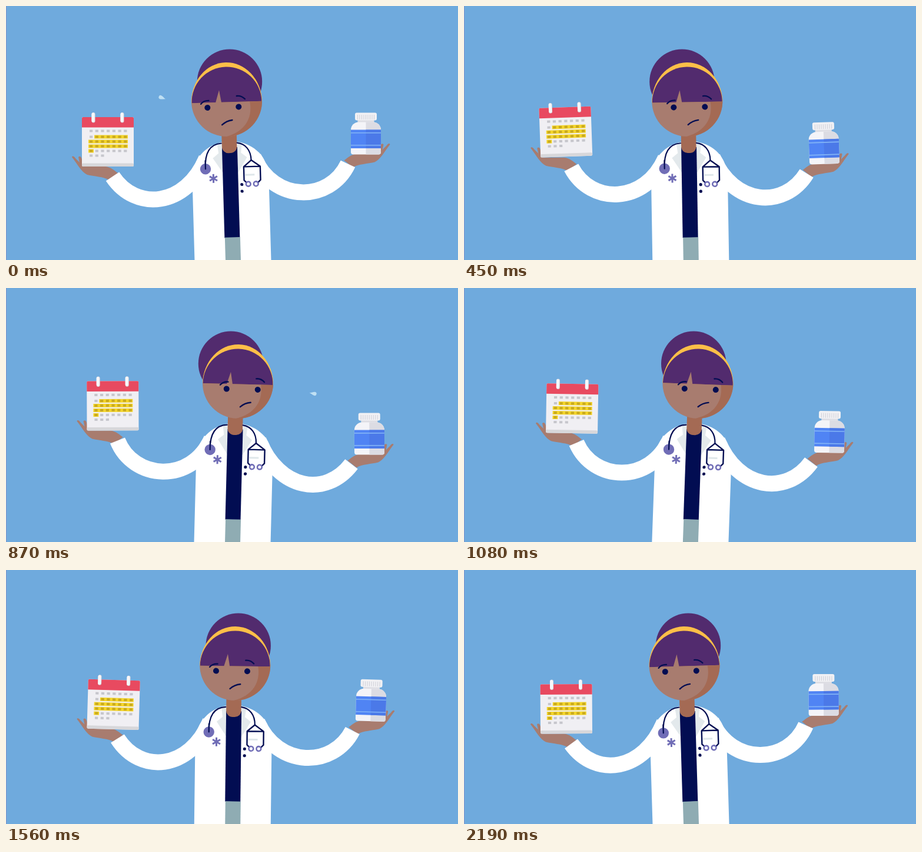
An HTML page with a canvas for the animation above (2220 ms loop, 768 by 432 pixels).

```html
<!DOCTYPE html>
<html lang="en">
<head>
<meta charset="utf-8">
<title>Doctor weighing options</title>
<style>
html, body { margin: 0; width: 100%; height: 100%; overflow: hidden; background: #6faadd; }
canvas { display: block; width: 100vw; height: 100vh; }
</style>
</head>
<body>
<canvas id="stage" width="768" height="432"></canvas>
<script>
const ctx = document.getElementById('stage').getContext('2d');
const LOOP = 2220, STEP = 30, SWAY = 2400;
const NAVY = '#020d52', SKIN = '#a87c6f', SHADE = '#a46a54', HAIR = '#522b6e',
  BAND = '#fdbf48', LILAC = '#706db6', COAT = '#ffffff', TAU = Math.PI * 2;
const PIVOT = 415;

// Pose keys; the sway is a little longer than the loop.
const TIMES = [0, 240, 630, 870, 1290, 1800, 2190];
const POSE = {
  head: [375, 375, 385, 394, 397, 381, 374.5],
  bun: [380, 372, 373, 382, 396, 390, 381],
  gaze: [-33, -28, -20, -19, -27, -35, -33],
  leftX: [181, 180.5, 185, 189.5, 191, 187, 182],
  leftY: [290, 283.5, 267, 259.5, 272, 297, 295.5],
  rightX: [581, 581.5, 583.5, 587, 591.5, 585, 580.7],
  rightY: [268.5, 276, 292, 299.5, 288, 262.5, 264],
  tilt: [0, -2, -1.3, -0.2, 1.8, 1, -0.3]
};

function sample(v, t) {
  const n = TIMES.length;
  const wrap = i => (i + n) % n;
  const time = i => TIMES[wrap(i)] + SWAY * Math.floor(i / n);
  const slope = i => (v[wrap(i + 1)] - v[wrap(i)]) / (time(i + 1) - time(i));
  const tangent = i => {
    const a = time(i) - time(i - 1), b = time(i + 1) - time(i);
    return (b * slope(i - 1) + a * slope(i)) / (a + b);
  };
  let i = 0;
  while (i < n - 1 && TIMES[i + 1] <= t) i++;
  const h = time(i + 1) - time(i), u = (t - time(i)) / h, w = 1 - u;
  return v[i] * (1 + 2 * u) * w * w + tangent(i) * h * u * w * w +
    v[wrap(i + 1)] * u * u * (3 - 2 * u) - tangent(i + 1) * h * u * u * w;
}

function shape(d, color) {
  ctx.fillStyle = color;
  ctx.fill(new Path2D(d));
}

function line(d, color, width, cap = 'round') {
  ctx.strokeStyle = color;
  ctx.lineWidth = width;
  ctx.lineCap = cap;
  ctx.lineJoin = 'round';
  ctx.stroke(new Path2D(d));
}

function rect(x, y, w, h, color, r = 0) {
  ctx.fillStyle = color;
  ctx.beginPath();
  ctx.roundRect(x, y, w, h, r);
  ctx.fill();
}

function disc(x, y, r, color) {
  ctx.fillStyle = color;
  ctx.beginPath();
  ctx.arc(x, y, r, 0, TAU);
  ctx.fill();
}

function ring(x, y, r, color, width) {
  ctx.strokeStyle = color;
  ctx.lineWidth = width;
  ctx.beginPath();
  ctx.arc(x, y, r, 0, TAU);
  ctx.stroke();
}

function at(x, y, angle, draw) {
  ctx.save();
  ctx.translate(x, y);
  ctx.rotate(angle);
  draw();
  ctx.restore();
}

// side is 1 for the arm on the left of the stage, -1 for the other one
function arm(x, y, side, lean) {
  const drop = y - 260, angle = (22 + drop * 0.39) * Math.PI / 180;
  const sx = 385 - side * 40 + lean * (PIVOT - 258), sy = 258 - side * 40 * lean;
  ctx.strokeStyle = COAT;
  ctx.lineWidth = 27;
  ctx.lineCap = 'butt';
  ctx.beginPath();
  ctx.moveTo(x, y);
  ctx.bezierCurveTo(x + side * 72 * Math.sin(angle), y + 72 * Math.cos(angle),
    sx - side * 35, 334 + drop * 0.26, sx, sy);
  ctx.stroke();
}

function hand(x, y, side) {
  ctx.save();
  ctx.translate(x, y);
  ctx.scale(side, 1);
  shape('M-58 -33C-55 -36 -53 -33 -52 -29L-48 -17L-54 -14Z', SKIN);
  shape('M-69 -33C-68 -36 -65 -34 -63 -31L-54 -22L-50 -17L-12 -17C-3 -16 2 -11 9 -6' +
    'L-6 6C-15 0 -32 0 -43 -3C-52 -7 -59 -20 -69 -33Z', SKIN);
  ctx.restore();
}

function calendar() {
  const rows = [23.5, 33.5, 41.5, 49.5, 57.5, 65.5];
  rect(0, -84, 88, 84, '#f0eff3', 2);
  rect(0, -5.5, 88, 5.5, '#d7d7da', 2);
  rect(0, -84, 88, 17.5, '#e84a60', [2, 2, 0, 0]);
  [[21, 1, 57], [11, 2, 67], [11, 3, 67], [11, 4, 9]].forEach(([x, r, w]) =>
    rect(x, rows[r] - 87, w, 6, '#f4d52b'));
  rows.forEach((y, r) => {
    for (let c = 0; c < (r === 5 ? 3 : 7); c++) {
      const marked = r === 1 ? c > 0 : r === 2 || r === 3 || (r === 4 && c === 0);
      rect(13 + c * 9.7, y - 86, 5.2, 4, marked ? '#c8a91f' : '#c6c6cc');
    }
  });
  [19.5, 68.5].forEach(x => {
    line(`M${x} -89V-77.5`, '#d9d9df', 6);
    line(`M${x - 0.5} -89V-78`, '#f7f7fa', 5);
  });
}

function bottle() {
  rect(-14, -60, 28, 9, '#dedee4');
  rect(-25.5, -55, 51, 55, '#f4f4f8', [13, 13, 4, 4]);
  rect(0, -55, 25.5, 55, '#dcdce3', [0, 13, 4, 0]);
  rect(-25.5, -42, 51, 31.5, '#5084f4');
  rect(0, -42, 25.5, 31.5, '#4b79e8');
  [-37.5, -16.5].forEach(y => rect(-25.5, y, 51, 1.6, '#83b5f7'));
  rect(-18.5, -71, 37, 13, '#f1f1f4', 3);
  for (let x = -14; x <= 14; x += 3.5) rect(x - 0.5, -67.5, 1, 8, '#cfcfd7');
}

function torso() {
  shape('M320 450V302C320 278 324 264 336 251C346 240 358 234 372 231H398' +
    'C413 234 425 240 435 251C446 264 450 278 450 302V450Z', COAT);
  shape('M364 235L373 232V284L356 258L366 250Z', '#e3e9ec');
  shape('M406 235L398 232V284L414 258L404 250Z', '#e3e9ec');
  rect(372, 240, 26, 154, NAVY);
  rect(372.5, 393.5, 26, 50, '#8facb3');
  rect(372, 205, 25.5, 45, SHADE, [0, 0, 11, 11]);

  line('M371 233C353 234 342 246 343 276', NAVY, 2.2);
  disc(343, 276, 9.2, LILAC);
  line('M343 262V276', NAVY, 2.2);
  line('M398 233C412 235 421 246 421 263', NAVY, 2.2);
  for (let i = 0; i < 3; i++) at(356, 292.5, i * Math.PI / 3, () => line('M0 -7.5V7.5', LILAC, 3, 'butt'));

  line('M421 263L408 274V297L412 301M421 263L436 274V297L432 301M409 274H435', NAVY, 2.4);
  rect(410, 286.5, 16, 3, '#dfe7ea');
  [415, 428].forEach(x => ring(x, 303.5, 3.9, LILAC, 2.6));
  [304, 315.5].forEach(y => disc(404, y, 2.6, NAVY));
}

// Drawn around the centre of the face
function head(gaze) {
  disc(0, 0, 60, SKIN);
  shape('M38 -4C46 28 30 52 -2 60A60 60 0 0 0 60 -2Z', SHADE);
  const dome = (rx, ry, color) => {
    ctx.fillStyle = color;
    ctx.beginPath();
    ctx.ellipse(0, 1.5, rx, ry, 0, Math.PI, TAU);
    ctx.fill();
  };
  dome(60, 67.5, BAND);
  dome(59.5, 60, HAIR);
  shape('M-19 2L-12.5 -19L-9 2Z', SKIN);

  ctx.save();
  ctx.translate(gaze, 10);
  disc(0, 0, 5, NAVY);
  disc(53, 0, 5, NAVY);
  line('M-11 -6.5Q-6 -12.5 2.5 -12', NAVY, 2.3);
  line('M50 -18.5Q58 -19.5 64 -13', NAVY, 2.3);
  line('M24 30C28.5 26 33.5 23 41.5 22.2', NAVY, 2.4);
  ctx.restore();
}

// Sweat: start, life, position at start, speed per 240 ms
const DROPS = [
  [0, 390, 265, 156, -35, -13],
  [510, 480, 465, 169, 38, 7],
  [1170, 270, 481, 138, 36, -26]
];

function sweat(t) {
  for (const [start, life, x, y, vx, vy] of DROPS) {
    const age = t - start;
    if (age < 0 || age >= life) continue;
    const k = age / 240, size = Math.min(1, (life - age) / 90);
    at(x + vx * k, y + vy * k, Math.atan2(vy, vx), () => {
      ctx.scale(size, size);
      shape('M-6.5 0C-3 -1 0 -3.2 2.5 -3.2A3.2 3.2 0 0 1 2.5 3.2C0 3.2 -3 1 -6.5 0Z', '#bfe0f3');
    });
  }
}

function draw(t) {
  const p = {};
  for (const key in POSE) p[key] = sample(POSE[key], t);
  const lean = (p.head - 385) / 345, tilt = p.tilt * Math.PI / 180;

  rect(0, 0, 768, 432, '#6faadd');
  rect(0, 0, 1, 432, '#7d93cc');
  sweat(t);
  disc(p.bun, 128.7, 55.2, HAIR);

  hand(p.leftX, p.leftY, 1);
  hand(p.rightX + 2.5, p.rightY, -1);
  arm(p.leftX, p.leftY, 1, lean);
  arm(p.rightX, p.rightY, -1, lean);
  at(p.leftX - 52, p.leftY - 17, tilt, calendar);
  at(p.rightX + 30.5, p.rightY - 16, tilt, bottle);

  at(385, PIVOT, lean, () => {
    ctx.translate(-385, -PIVOT);
    torso();
  });
  at(p.head, 162, lean, () => head(p.gaze));
}

const begin = performance.now();
function frame() {
  const t = (performance.now() - begin) % LOOP;
  draw(Math.floor(t / STEP) * STEP);
  requestAnimationFrame(frame);
}
frame();
</script>
</body>
</html>
```
